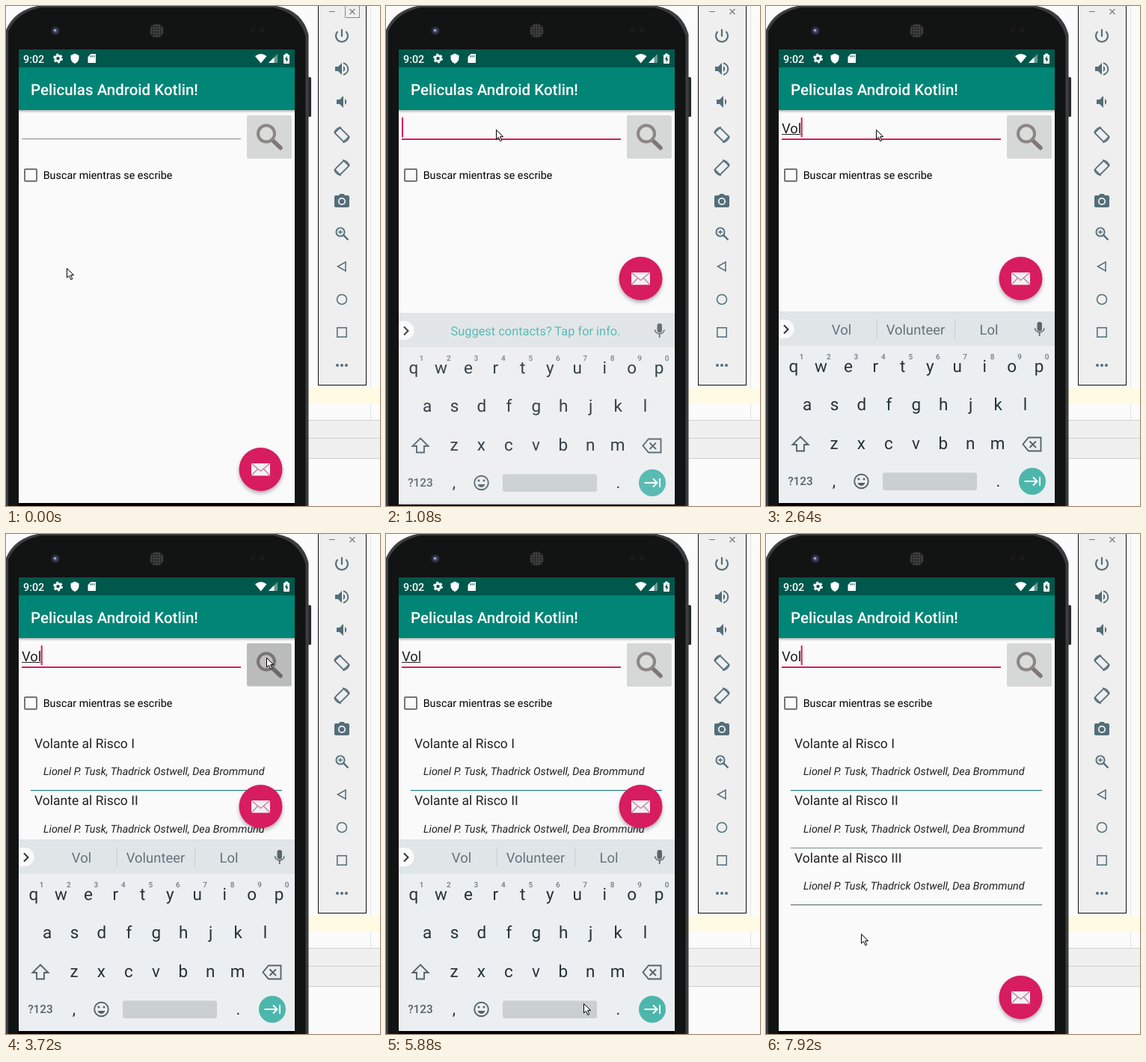
An HTML page for the animation above (8000 ms loop, 500 by 668 pixels).

```html
<!DOCTYPE html>
<html lang="es">
<head>
<meta charset="utf-8">
<title>Buscador</title>
<style>
html, body { margin: 0; width: 100%; height: 100%; overflow: hidden; background: #fbfbfb; }
svg { display: block; width: 500px; height: 668px; }
text { font-family: Roboto, "Noto Sans", sans-serif; text-rendering: geometricPrecision; white-space: pre; }
.mid { text-anchor: middle; }
.line { fill: none; stroke-linecap: butt; }
</style>
</head>
<body>
<svg id="stage" viewBox="0 0 500 668" xmlns="http://www.w3.org/2000/svg"></svg>
<script>
const LOOP = 8000, TICK = 120;
const PINK = '#d81b60', SLATE = '#546e7a', KEY = '#263238';

const el = (tag, attrs, inner = '') =>
  `<${tag} ${Object.entries(attrs).map(([k, v]) => `${k}="${v}"`).join(' ')}>${inner}</${tag}>`;
const rect = (x, y, width, height, fill, more) => el('rect', { x, y, width, height, fill, ...more });
const disc = (cx, cy, r, fill, more) => el('circle', { cx, cy, r, fill, ...more });
const path = (d, fill, more) => el('path', { d, fill, ...more });
const line = (d, stroke, w = 2, more) => el('path', { d, class: 'line', stroke, 'stroke-width': w, ...more });
const label = (x, y, size, str, fill, more) => el('text', { x, y, 'font-size': size, fill, ...more }, str);
const mid = (x, y, size, str, fill, more) => label(x, y, size, str, fill, { class: 'mid', ...more });
const group = (id, inner, more) => el('g', { id, ...more }, inner);
const at = (x, y, inner, more = '') => `<g transform="translate(${x} ${y}) ${more}">${inner}</g>`;

const defs = `<defs>
  <linearGradient id="fall" x2="0" y2="1"><stop stop-opacity=".28"/><stop offset="1" stop-opacity="0"/></linearGradient>
  <filter id="lift" x="-30%" y="-30%" width="160%" height="170%">
    <feDropShadow dx="0" dy="3" stdDeviation="2.5" flood-opacity=".3"/></filter>
  <clipPath id="view"><rect id="viewBox" x="17" y="139" width="369" height="525"/></clipPath>
</defs>`;

function desktop() {
  return rect(0, 0, 500, 668, '#fbfbfb') +
    rect(487, 0, 1, 554, '#e3e3e3') +
    rect(400, 510, 100, 21, '#fffae3') +
    rect(400, 553, 100, 52, '#f0f0f0') +
    [553, 577, 604].map(y => rect(400, y, 100, 1, '#d0d0d0')).join('');
}

function speaker(waves) {
  return path('M-9 -3H-5L0 -8V8L-5 3H-9Z', SLATE) + path('M2 -4A4.6 4.6 0 0 1 2 4Z', SLATE) +
    (waves ? line('M2 -7.8A8 8 0 0 1 2 7.8', SLATE) : '');
}

const turned = rect(-8.5, -5, 17, 10, 'none', { stroke: SLATE, 'stroke-width': 1.8, rx: 1.5, transform: 'rotate(45)' }) +
  line('M-10 -2A10.3 10.3 0 0 1 -1 -10.3M10 2A10.3 10.3 0 0 1 1 10.3', SLATE, 1.6);

function toolbar() {
  const icons = [
    line('M0 -9V1M-5.5 -6A8 8 0 1 0 5.5 -6', SLATE, 2.2),
    speaker(true),
    at(2, 0, speaker(false)),
    turned,
    `<g transform="scale(-1 1)">${turned}</g>`,
    path('M-8 -7H-4L-2.5 -9H2.5L4 -7H8Q10 -7 10 -5V7Q10 9 8 9H-8Q-10 9 -10 7V-5Q-10 -7 -8 -7Z', SLATE) +
      disc(0, 1, 4.2, SLATE, { stroke: '#efefef', 'stroke-width': 1.8 }),
    disc(-2, -2, 5.6, 'none', { stroke: SLATE, 'stroke-width': 1.9 }) +
      line('M2.2 2.2L8.5 8.5', SLATE, 2.4) + line('M-5 -2H1M-2 -5V1', SLATE, 1.3),
    line('M5 -6V6L-5.5 0Z', SLATE, 1.5),
    disc(0, 0, 6.5, 'none', { stroke: SLATE, 'stroke-width': 1.5 }),
    rect(-6.2, -6.2, 12.4, 12.4, 'none', { stroke: SLATE, 'stroke-width': 1.5 }),
    [-6, 0, 6].map(x => disc(x, 0, 2, SLATE)).join('')
  ];
  return rect(417.5, -2, 64, 508.5, '#efefef', { stroke: '#111' }) +
    line('M432 7.5H440', '#777', 1) + line('M459.5 4L466.5 11M466.5 4L459.5 11', '#777', 1.1) +
    rect(453.5, -1, 19, 16.5, 'none', { id: 'focus', stroke: '#222', 'stroke-dasharray': '1 1' }) +
    icons.map((icon, i) => at(449, 40 + 44 * i, icon)).join('');
}

function phone() {
  const dots = [];
  for (let y = -7; y <= 7; y += 3.5)
    for (let x = -7; x <= 7; x += 3.5)
      if (Math.hypot(x, y) < 8.5) dots.push(disc(201.5 + x, 33 + y, 1, '#555'));
  return rect(402, 95, 6, 53, '#26282a', { rx: 1.5 }) +
    path('M0 668V32Q11 6 42 0H362Q396 6 404.5 38V668Z', '#3b3d3f') +
    path('M3 668V34Q14 9 46 2H358Q391 9 400.5 40V668Z', '#121313') +
    disc(66, 33, 6, '#25262a') + disc(66, 33, 3.6, '#3d4670') + disc(65.5, 32.5, 1.6, '#a9b0dd') +
    disc(201.5, 33, 9.5, '#2b2b2b') + dots.join('') +
    disc(330, 32, 3, '#1d1a1a') + disc(342, 32, 3, '#1d1a1a') +
    rect(17, 58, 369, 610, '#000') + rect(17, 58, 369, 606, '#fafafa');
}

function bars() {
  return rect(17, 58, 369, 24, '#00574b') + rect(17, 82, 369, 57, '#008577') +
    rect(17, 139, 369, 4, 'url(#fall)') +
    label(23, 75.5, 14.35, '9:02', '#fff', { 'font-weight': 500 }) +
    disc(69.5, 70, 3.6, 'none', { stroke: '#fff', 'stroke-width': 2.8 }) +
    disc(69.5, 70, 5.4, 'none', { stroke: '#fff', 'stroke-width': 2, 'stroke-dasharray': '2.8 2.85' }) +
    path('M92 63.5L97.5 66V70Q97 75 92 77Q87 75 86.500 70V66Z', '#fff') +
    path('M113.500 64H120V76H109.500V68Z', '#fff') +
    line('M113.500 66V68.500M115.700 66V68.500M117.900 66V68.500', '#00574b', 1) +
    path('M333 67Q340.500 61 348.500 67L340.700 76.500Z', '#fff') +
    path('M363 64V76H351Z', '#fff', { opacity: .4 }) + path('M358.500 68.500V76H351Z', '#fff') +
    rect(371, 65, 8, 12, '#fff', { rx: 1 }) + rect(373.2, 63.5, 3.6, 2, '#fff') +
    path('M375.700 66.500L372.700 71.500H374.700V75.500L377.500 70.500H375.700Z', '#00574b') +
    label(33, 119, 20.5, 'Peliculas Android Kotlin!', '#fff', { 'font-weight': 500 });
}

function search() {
  return rect(21, 177, 293, 1, '#8a8a8a', { id: 'rule' }) +
    label(21, 169.7, 18.45, '', '#212121', { id: 'query' }) +
    rect(21, 171, 26, 1, '#212121', { id: 'compose' }) +
    rect(21, 149, 2, 26, PINK, { id: 'caret' }) +
    rect(322, 147, 60, 57, '#000', { opacity: .12, rx: 2 }) +
    rect(322, 146, 59.5, 57, '#d6d7d7', { rx: 2 }) +
    line('M357 180L367 189.500', '#7d7777', 5.5, { style: 'stroke-linecap:round' }) +
    disc(348, 170.5, 11, '#dcdcdc', { stroke: '#8c8686', 'stroke-width': 4 }) +
    disc(352, 174, 27, '#000', { id: 'ripple', opacity: .1 }) +
    rect(322, 146, 59.5, 57, '#000', { id: 'press', rx: 2 }) +
    rect(25, 218, 16, 16, 'none', { stroke: '#757575', 'stroke-width': 2, rx: 1 }) +
    label(49.7, 231, 14.35, 'Buscar mientras se escribe', '#000');
}

function results() {
  const cast = 'Lionel P. Tusk, Thadrick Ostwell, Dea Brommund';
  const rows = ['I', 'II', 'III'].map((n, i) => at(0, 76.5 * i,
    label(38, 285.5, 17.5, 'Volante al Risco ' + n, '#212121') +
    label(50, 322, 14.35, cast, '#212121', { 'font-style': 'italic' }) +
    rect(33, i % 2 ? 342.5 : 342, 336, 1, ['#0a7a6c', '#7d8a87', '#4d6660'][i])));
  return group('list', rows.join(''), { 'clip-path': 'url(#view)' });
}

function mailButton() {
  return group('fab', disc(0, 0, 29, PINK, { filter: 'url(#lift)' }) +
    rect(-12.5, -8, 25, 16.5, '#f4f0f1', { rx: 1 }) +
    line('M-12 -7.500L0 2.500L12 -7.500M-12 8L-4 -.5M12 8L4 -.5', '#b9829a', 1.3));
}

function keyboard() {
  const row = (keys, x0, y) => [...keys].map((k, i) => mid(x0 + 36.45 * i, y, 22.5, k, KEY)).join('');
  const digits = [...'1234567890'].map((d, i) => mid(47.5 + 36.45 * i, 471.5, 10, d, '#6d7a80', { 'font-weight': 500 }));
  const words = [['Vol', 101], ['Volunteer', 200], ['Lol', 298]].map(([w, x]) => mid(x, 439, 18.45, w, '#66747b'));
  return group('keys',
    rect(17, 408, 369, 256, '#eceff1') + rect(17, 408, 369, 46, '#e0e5e8') +
    path('M17 419H25A12.500 12.500 0 0 1 25 444H17Z', '#fafafa') +
    line('M24 426.500L29.500 432L24 437.500', '#333', 2) +
    rect(362.500, 422, 6.5, 12.5, '#59666c', { rx: 3.2 }) +
    line('M359.500 430.500A6.300 6.300 0 0 0 372 430.500M365.700 436.500V441', '#59666c', 1.7) +
    group('tip', mid(200, 437.7, 16.4, 'Suggest contacts? Tap for info.', '#4db6ac')) +
    group('words', words.join('') + rect(148, 419, 1, 25, '#c5cccf') + rect(252, 419, 1, 25, '#c5cccf')) +
    row('qwertyuiop', 37, 488.5) + digits.join('') + row('asdfghjkl', 55, 540) + row('zxcvbnm', 91, 591.5) +
    line('M46 575.500L56.500 586H51V594.500H41V586H35.500Z', '#55636a', 1.9) +
    line('M351 576.500H367.500V594.500H351L343.500 585.500Z', '#55636a', 1.9) +
    line('M352.500 581.500L361 590M361 581.500L352.500 590', '#55636a', 1.9) +
    mid(46, 640.3, 15.4, '?123', '#55636a', { 'font-weight': 500 }) +
    mid(91, 642, 22, ',', KEY) + mid(310.5, 642, 22, '.', KEY) +
    disc(127.5, 635, 9.3, 'none', { stroke: '#55636a', 'stroke-width': 1.9 }) +
    disc(124, 632, 1.5, '#55636a') + disc(131, 632, 1.5, '#55636a') +
    path('M122.500 637H132.500Q131 641 127.500 641Q124 641 122.500 637Z', '#55636a') +
    rect(156, 623.5, 126, 23.5, '#cacfd2', { rx: 3 }) +
    disc(356, 635, 18, '#4db6ac') +
    line('M345.500 635H362M357 629.500L362.500 635L357 640.500M366 629V641', '#fff', 2));
}

const pointer = group('pointer',
  path('M.5 .5V13L3.500 10.300L5.700 15.600L7.800 14.700L5.600 9.600H9.600Z', '#fff', { stroke: '#000', 'stroke-linejoin': 'round' }));

document.getElementById('stage').innerHTML = defs + desktop() + toolbar() + phone() + bars() +
  search() + results() + mailButton() + keyboard() + pointer;

const ui = {};
document.querySelectorAll('[id]').forEach(n => ui[n.id] = n);
const set = (id, attrs) => { for (const k in attrs) ui[id].setAttribute(k, attrs[k]); };
const show = (id, on) => { ui[id].style.display = on ? '' : 'none'; };

// [time, x, y]: pointer stops, eased in between
const route = [
  [0, 81, 350], [720, 147, 165], [2760, 147, 165], [3480, 348, 165], [3960, 348, 165],
  [4440, 263, 342], [4560, 297, 388], [4920, 297, 388], [5280, 262, 380], [5520, 262, 380],
  [5760, 261, 560], [5880, 264, 627], [6120, 264, 632], [6720, 264, 632], [6840, 240, 690],
  [7080, 150, 690], [7440, 180, 590], [7560, 206, 520], [7680, 80, 470], [7800, 4, 500], [7920, 127, 534]
];
// [time, value]: values held until the next entry
const typed = [[0, ''], [2280, 'V'], [2400, 'Vo'], [2520, 'Vol']];
const caretOn = [[0, 0], [960, 1], [1440, 0], [1920, 1], [3000, 0], [3480, 1], [3960, 0], [4440, 1],
  [4920, 0], [5400, 1], [5880, 0], [6360, 1], [6840, 0], [6960, 1], [7440, 0], [7920, 1]];
const pressed = [[0, 0], [3720, .13], [3960, .06], [4080, 0]];
const keysDrop = [[0, null], [1080, 2], [1200, 0], [6960, 4], [7080, null]];
const caretX = { '': 21, V: 33, Vo: 43, Vol: 46.7 };

const held = (table, t) => table.filter(([at]) => at <= t).pop()[1];

function place(t) {
  const i = route.findIndex(p => p[0] > t);
  if (i < 0) return route[route.length - 1].slice(1);
  const [t0, x0, y0] = route[i - 1], [t1, x1, y1] = route[i];
  const u = (t - t0) / (t1 - t0), e = u * u * (3 - 2 * u);
  return [x0 + (x1 - x0) * e, y0 + (y1 - y0) * e].map(Math.round);
}

function draw(t) {
  const query = held(typed, t), drop = held(keysDrop, t), up = drop !== null, focused = t >= 960;
  set('pointer', { transform: `translate(${place(t)})` });
  show('focus', t < 120);
  set('rule', focused ? { height: 2, fill: PINK } : { height: 1, fill: '#8a8a8a' });
  ui.query.textContent = query;
  set('caret', { x: caretX[query] });
  show('caret', held(caretOn, t));
  show('compose', query && t < 6960);
  set('compose', { width: caretX[query] - 21 });
  show('ripple', t === 3600);
  set('press', { opacity: held(pressed, t) });
  show('list', t >= 3720);
  set('viewBox', { height: up ? 269 : 525 });
  set('fab', { transform: `translate(340.5 ${up ? 364 : 619})` });
  show('keys', up);
  set('keys', { transform: `translate(0 ${drop || 0})`, opacity: drop ? 1 - drop * .04 : 1 });
  show('tip', t < 2280);
  show('words', t >= 2640 && t < 6960);
}

const start = performance.now();
let last = -1;
function frame() {
  const t = Math.floor((performance.now() - start) % LOOP / TICK) * TICK;
  if (t !== last) draw(last = t);
  requestAnimationFrame(frame);
}
frame();
</script>
</body>
</html>
```
